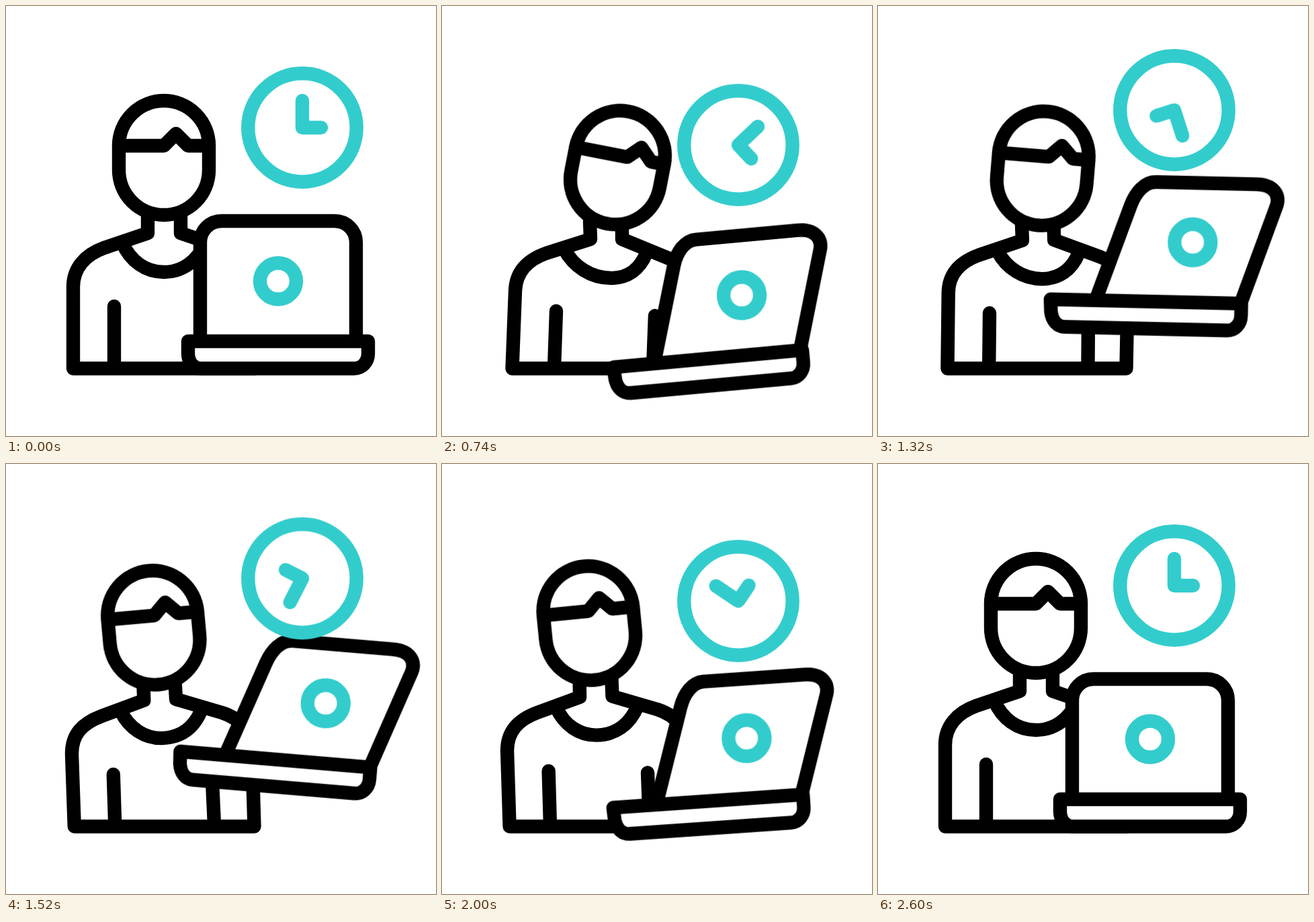
Animation of 640 by 640 pixels, one loop 3 s. Source, as an HTML page without scripts:

```html
<!DOCTYPE html>
<html lang="en">
<head>
<meta charset="utf-8">
<title>Working hours</title>
<style>
  html, body { margin: 0; width: 100%; height: 100%; overflow: hidden; background: #fff; }
  svg { display: block; width: 100%; height: 100%; }
  path, rect, circle { fill: #fff; stroke: #000; stroke-width: 20.4; stroke-linecap: round; stroke-linejoin: round; }
  .accent { fill: none; stroke: #33cccc; }

  .body, .head, .hair, .lift, .tilt, .screen, .base, .badge, .clock, .hands {
    animation: 3s cubic-bezier(.333, 0, .667, 1) infinite;
  }
  .body { animation-name: body; }
  .head { animation-name: head; transform-origin: 235px 226px; }
  .hair { animation-name: hair; }
  .lift { animation-name: lift; }
  .tilt { animation-name: tilt; transform-origin: 405px 534px; }
  .screen { animation-name: screen; }
  .base { animation-name: base; }
  .badge { animation-name: badge; }
  .clock { animation-name: bob; }
  .hands { animation-name: hands; transform-origin: 441px 181px; }

  /* Person: lean right, hold, lean left, return */
  @keyframes body {
    0%, 6.667%, 75.667%, 100% {
      d: path("M211 305 L211 338 L146 360 C118 370 100 390 100 418 L100 539.5 L370 539.5 L370 418 C370 390 352 370 324 360 L260 338 L260 305 M173 352 C185 380 208 396 235 396 C262 396 285 380 297 352 M161 447 L161 539 M309 447 L309 539");
    }
    23.667%, 36.667% {
      d: path("M220 320 L221 347 L155 368 C127 378 110 396 109 424 L104.5 539.5 L369.5 539.5 L375 430 C376 403 362 386 336 375 L268 347 L268 320 M182 362 C196 388 222 405 252 405 C275 405 294 393 304 368 M170 454 L167 539 M317 461 L314 539");
    }
    56.667%, 59.667% {
      d: path("M200 325 L201 353 L139 377 C110 388 94 404 95 435 L101 539.5 L369.5 539.5 L364 435 C362 398 348 378 318 369 L249 351 L247 325 M168 370 C180 395 202 409 226 409 C254 408 275 395 287 366 M157 464 L161 539 M304 468 L309 539");
    }
  }
  @keyframes head {
    0%, 6.667%, 75.667%, 100% { transform: none; }
    23.667%, 36.667% { transform: translate(26.5px, 14.5px) rotate(11deg); }
    56.667%, 59.667% { transform: translate(-26.5px, 18.5px) rotate(-9.5deg); }
  }
  @keyframes hair {
    0%, 6.667%, 56.667%, 100% { d: path("M168 208 L235 208 L253 190 L271 208 L302 208"); }
    23.667%, 36.667% { d: path("M168 208 L246 208 L264 190 L282 208 L302 208"); }
  }

  /* Laptop: rise, tilt and turn */
  @keyframes lift {
    0%, 6.667%, 86.667%, 100% { transform: none; }
    23.333% { transform: translateY(26px); }
    47% { transform: translateY(-63px); }
    73.333% { transform: translateY(14.5px); }
  }
  @keyframes tilt {
    0%, 6.667%, 86.667%, 100% { transform: none; }
    30% { transform: rotate(-6deg); }
    53.333% { transform: rotate(5.2deg); }
    70% { transform: rotate(-5deg); }
  }
  @keyframes screen {
    0%, 6.667%, 86.667%, 100% {
      d: path("M289 499 L289 352 C289 334 303 320 321 320 L489 320 C507 320 521 334 521 352 L521 499");
    }
    30%, 63.333% {
      d: path("M323 499 L372 357 C379 337 392 321 409 321 L559 321 C584 321 596 336 588 356 L539 499");
    }
  }
  @keyframes base {
    0%, 6.667%, 86.667%, 100% {
      d: path("M271 499 L539 499 L539 517 C539 530 530 539.5 518 539.5 L290 539.5 C279 539.5 271 530 271 517 Z");
    }
    30%, 63.333% {
      d: path("M256 499 L540 499 L540 517 C540 530 531 539.5 520 539.5 L278 539.5 C267 539.5 259 531 257 517 Z");
    }
  }
  @keyframes badge {
    0%, 6.667%, 86.667%, 100% { transform: none; }
    30%, 63.333% { transform: translateX(60.6px); }
  }

  @keyframes bob {
    0%, 6.667%, 81.333%, 100% { transform: none; }
    25.333%, 62.667% { transform: translateY(26px); }
    44% { transform: translateY(-26px); }
  }
  @keyframes hands {
    0%, 6.667% { transform: rotate(0deg); }
    86.667%, 100% { transform: rotate(360deg); }
  }
</style>
</head>
<body>
<svg viewBox="0 0 640 640">
  <path class="body"/>
  <g class="head">
    <rect x="168" y="141" width="134" height="170" rx="67"/>
    <path class="hair" fill="none" style="fill:none"/>
  </g>
  <g class="lift">
    <g class="tilt">
      <path class="screen"/>
      <path class="base"/>
      <circle class="accent badge" cx="405" cy="409.5" r="27"/>
    </g>
  </g>
  <g class="clock">
    <circle class="accent" cx="441" cy="181" r="80.7"/>
    <path class="accent hands" d="M441 141 V181 H469"/>
  </g>
</svg>
</body>
</html>
```
